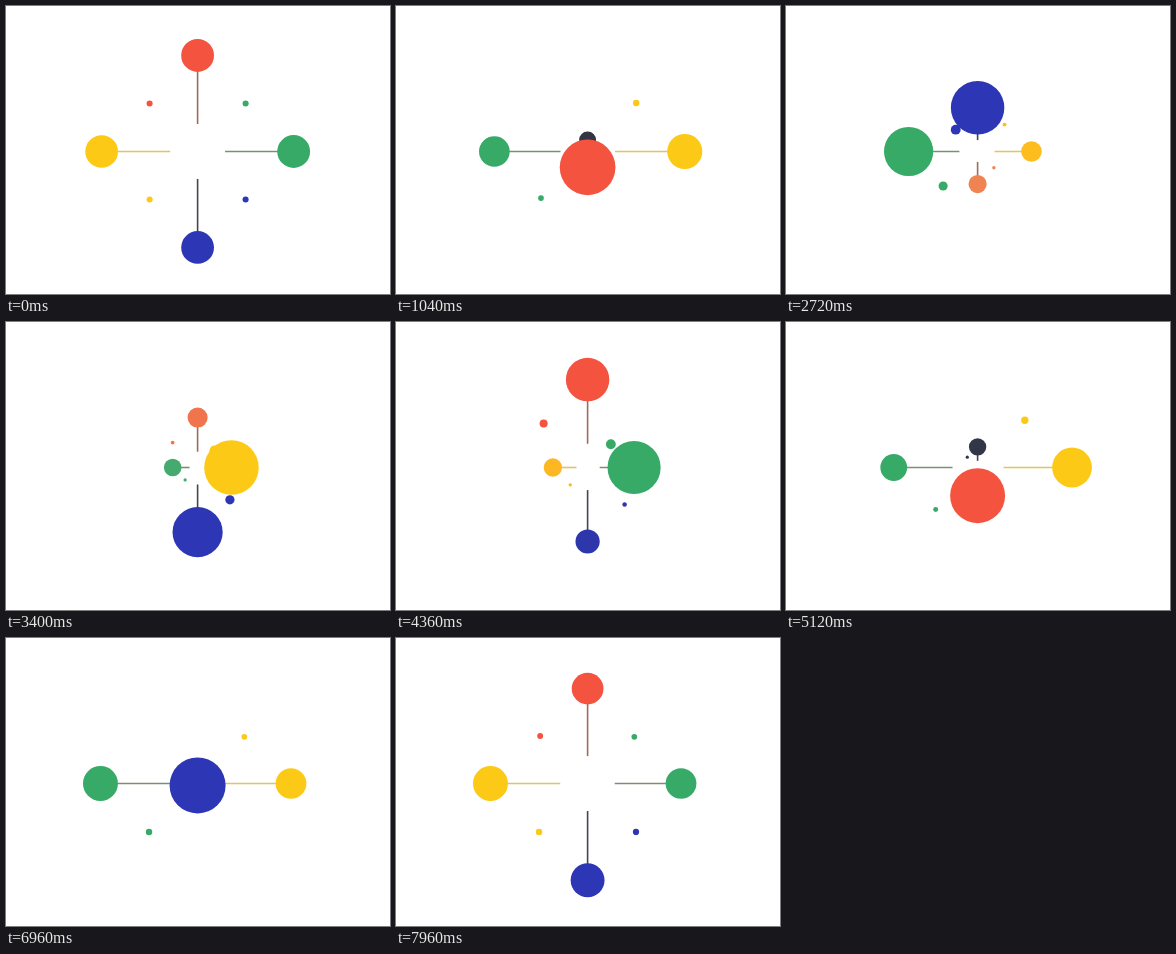
Write an HTML page with a canvas that moves like this. It is 384x288 px and loops after 8000 ms.

```html
<!DOCTYPE html>
<html lang="en">
<head>
<meta charset="utf-8">
<title>Orbiting dots</title>
<style>
html, body { margin: 0; width: 100%; height: 100%; overflow: hidden; background: #fff; }
canvas { display: block; }
</style>
</head>
<body>
<canvas id="stage" width="384" height="288"></canvas>
<script>
const ctx = document.getElementById('stage').getContext('2d');
const LOOP = 8000, CX = 191.6, CY = 145.5, ORBIT = 96, INNER = 0.286;

// turns: signed revolutions per loop; near and far: RGB at the front and the back
const arms = [
  { vertical: true, start: -90, turns: 2, near: [244, 83, 63], far: [238, 140, 85], line: '#a0695a' },
  { vertical: true, start: 90, turns: 2, near: [45, 54, 180], far: [51, 54, 63], line: '#45454f' },
  { vertical: false, start: -90, turns: -4, near: [252, 202, 22], far: [253, 178, 38], line: '#e3c45c' },
  { vertical: false, start: 90, turns: -4, near: [54, 170, 102], far: [70, 170, 110], line: '#7d8e72' }
];

const mix = (a, b, k) => `rgb(${a.map((v, i) => Math.round(v + (b[i] - v) * k))})`;

function pose(arm, t) {
  let angle = (arm.start + 360 * arm.turns * t / LOOP) * Math.PI / 180;
  // vertical arms hurry slightly through the centre
  if (arm.vertical) angle += 0.08 * Math.cos(angle) ** 10;
  const depth = Math.cos(angle);
  const along = part => ORBIT * part * Math.sin(angle) * (1 + 0.16 * part * depth);
  const point = d => arm.vertical ? [0, d] : [d, 0];
  return {
    arm, depth,
    outer: point(along(1)),
    inner: point(along(INNER)),
    radius: 16.4 + 8.6 * depth + 1.8 * depth ** 2 + 1.2 * depth ** 3,
    color: mix(arm.near, arm.far, Math.max(0, -depth - 0.5) * 2)
  };
}

function dot(x, y, r) {
  ctx.beginPath();
  ctx.arc(x, y, r, 0, Math.PI * 2);
  ctx.fill();
}

function drawArm({ arm, outer: [x, y], inner, radius, color }) {
  ctx.strokeStyle = arm.line;
  ctx.beginPath();
  ctx.moveTo(...inner);
  ctx.lineTo(x, y);
  ctx.stroke();
  ctx.fillStyle = color;
  // the satellite is the same point turned 45 degrees and drawn closer in
  dot((x + y) / 2, (y - x) / 2, radius * 0.185);
  dot(x, y, radius);
}

function frame() {
  const t = performance.now() % LOOP;
  ctx.setTransform(1, 0, 0, 1, 0, 0);
  ctx.fillStyle = '#fff';
  ctx.fillRect(0, 0, 384, 288);
  ctx.translate(CX, CY);
  ctx.lineWidth = 1.6;
  arms.map(arm => pose(arm, t)).sort((a, b) => a.depth - b.depth).forEach(drawArm);
  requestAnimationFrame(frame);
}
frame();
</script>
</body>
</html>
```
